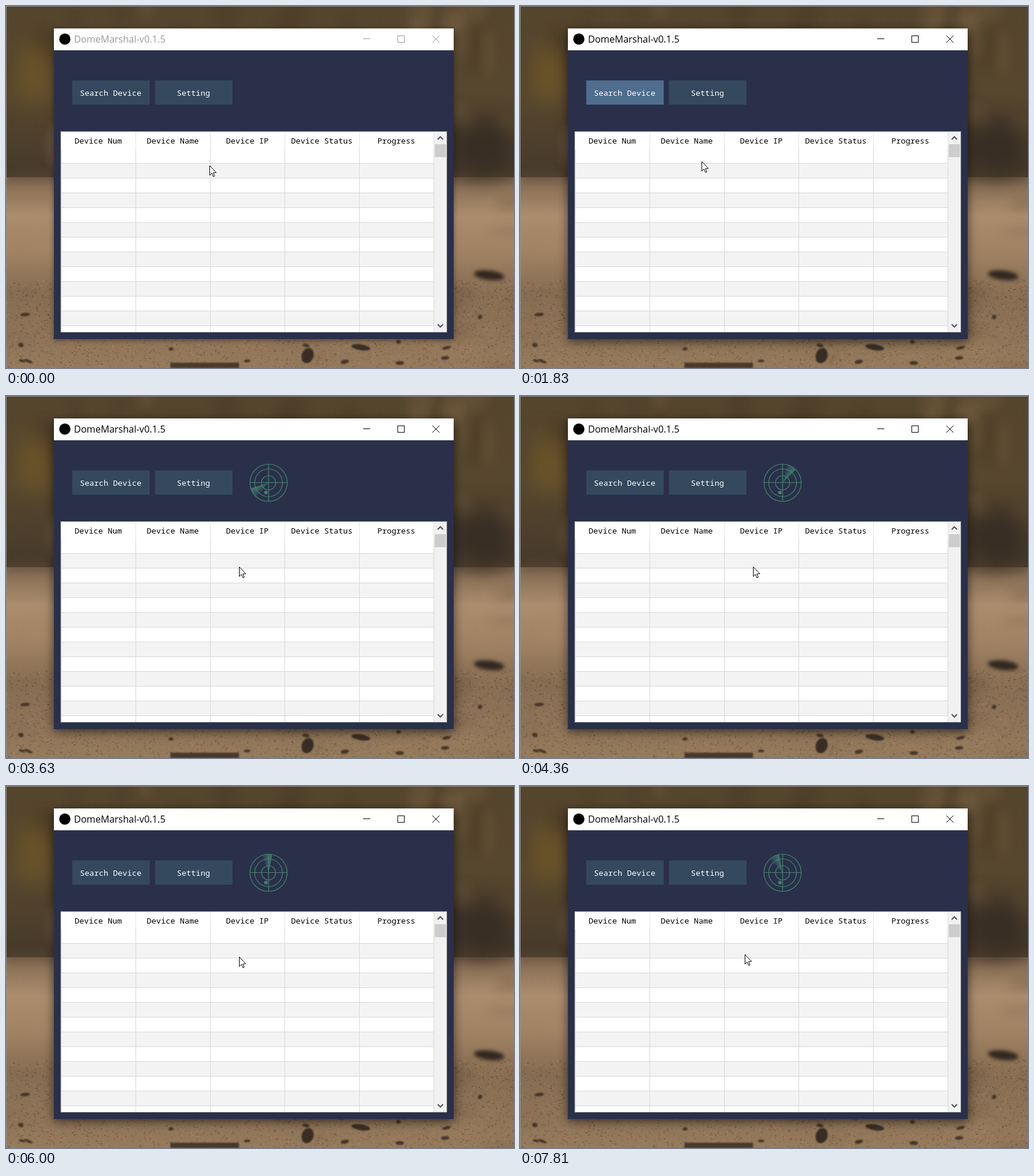
An HTML page with a canvas for the animation above (7990 ms loop, 859 px wide and 613 px high).

```html
<!DOCTYPE html>
<html lang="en">
<head>
<meta charset="utf-8">
<style>
  html, body { margin: 0; width: 100%; height: 100%; overflow: hidden; }
  canvas { display: block; }
</style>
</head>
<body>
<canvas id="stage" width="859" height="613"></canvas>
<script>
const W = 859, H = 613, LOOP = 7990, STEP = 181.6, HORIZON = 290;
const MONO = '300 13.33px "Noto Sans Mono", monospace';
const HEADERS = ['Device Num', 'Device Name', 'Device IP', 'Device Status', 'Progress'];
const NAVY = '#2a304a', SLATE = '#34495e', GRID = '#d8d8d8', GREEN = '#46836f';

// Cursor stops as [step, x, y].
const CURSOR = [
  [0, 344, 270], [3, 200, 144], [8, 200, 144], [10, 307, 263],
  [12, 394, 281], [15, 394, 281], [17, 394, 289], [40, 394, 289], [43, 380, 285]
];

const c = document.getElementById('stage').getContext('2d');
const backdrop = paintBackdrop();

function cursorAt(step) {
  const i = CURSOR.findIndex(k => k[0] >= step);
  const [t1, x1, y1] = CURSOR[i], [t0, x0, y0] = CURSOR[Math.max(i - 1, 0)];
  const f = (step - t0) / (t1 - t0 || 1);
  return [x0 + (x1 - x0) * f, y0 + (y1 - y0) * f];
}

// The sweep turns clockwise and slows slightly; degrees from the top.
function sweepAt(step) {
  const n = step - 15;
  return 42 + 39.8 * n - .13 * n * n;
}

function rect(g, color, x, y, w, h) {
  g.fillStyle = color;
  g.fillRect(x, y, w, h);
}

function disc(g, color, x, y, rx, ry = rx, turn = 0) {
  g.fillStyle = color;
  g.beginPath();
  g.ellipse(x, y, rx, ry, turn, 0, 7);
  g.fill();
}

function line(color, width, ...points) {
  c.strokeStyle = color;
  c.lineWidth = width;
  c.beginPath();
  for (let i = 0; i < points.length; i += 2) c.lineTo(points[i], points[i + 1]);
  c.stroke();
}

function text(string, x, y, color, font = MONO, align = 'center') {
  c.font = font;
  c.textAlign = align;
  c.fillStyle = color;
  c.fillText(string, x, y);
}

// Blurred woods above speckled sand.
function paintBackdrop() {
  const g = Object.assign(document.createElement('canvas'), { width: W, height: H }).getContext('2d');
  let seed = 7;
  const random = (a, b) => a + (b - a) * (seed = seed * 16807 % 2147483647) / 2147483647;
  const shade = alpha => random(0, 1) < .5 ? `rgba(40,28,16,${alpha})` : `rgba(190,160,120,${alpha})`;
  const fade = (top, bottom, colors) => {
    const tone = g.createLinearGradient(0, top, 0, bottom);
    colors.forEach((color, i) => tone.addColorStop(i / (colors.length - 1), color));
    rect(g, tone, 0, top, W, bottom - top);
  };
  fade(0, HORIZON, ['#55452d', '#57472e', '#46392a']);
  fade(HORIZON, H, ['#816850', '#ab8d6d', '#a08263', '#866c51', '#8d7257', '#957a5c']);

  g.filter = 'blur(8px)';
  rect(g, '#5f4c39', 0, HORIZON - 4, W, 8);
  for (let i = 0; i < 60; i++) {
    disc(g, shade(.1), random(0, W), random(0, HORIZON - 30), random(8, 25), random(15, 50));
    disc(g, shade(.1), random(0, W), random(HORIZON + 30, H), random(20, 50), random(4, 12));
  }
  g.filter = 'blur(18px)';
  disc(g, '#6a5429', 48, 115, 30, 50);
  disc(g, '#382e24', 805, 240, 60, 50);
  g.filter = 'none';

  for (let i = 0; i < 4500; i++)
    rect(g, shade(.25), random(0, W), H - 150 * random(0, 1), random(1, 3), random(1, 2));

  g.filter = 'blur(3px)';
  disc(g, '#30271f', 817, 456, 26, 8, .12);
  g.filter = 'blur(1px)';
  disc(g, '#382d24', 510, 592, 10, 13, .3);
  disc(g, '#3a2f26', 600, 578, 16, 5, .15);
  rect(g, '#4a3a2b', 278, 604, 116, 9);
  for (let i = 0; i < 24; i++)
    disc(g, '#453627', random(0, W), random(515, 605), random(3, 9), random(2, 4), random(-.3, .5));
  g.filter = 'none';

  rect(g, '#8d9094', 0, 0, W, 1);
  rect(g, '#8d9094', 0, 0, 1, H);
  return g.canvas;
}

function drawWindow(active, lit) {
  c.save();
  c.shadowColor = `rgba(0,0,0,${active ? .6 : .4})`;
  c.shadowBlur = active ? 16 : 9;
  c.shadowOffsetY = active ? 4 : 2;
  rect(c, NAVY, 81, 38, 676, 526);
  c.restore();
  rect(c, '#fff', 81, 38, 676, 37);

  const ink = active ? '#000' : '#999';
  disc(c, '#000', 99.5, 56, 9.5);
  text('DomeMarshal-v0.1.5', 115, 62, ink, '16px "Open Sans", sans-serif', 'left');
  line(ink, 1, 604, 55.5, 616, 55.5);
  c.strokeRect(662.5, 50.5, 11, 11);
  line(ink, 1, 721, 50, 733, 62);
  line(ink, 1, 733, 50, 721, 62);

  rect(c, lit ? '#4f6d8d' : SLATE, 112, 126, 131, 41);
  rect(c, SLATE, 252, 126, 131, 41);
  text('Search Device', 177, 152, '#fff');
  text('Setting', 317, 152, '#fff');
}

function drawTable(empty) {
  rect(c, '#828790', 92, 212, 654, 341);
  rect(c, '#fff', 93, 213, 652, 339);
  const pitch = empty ? 130.3 : 126;
  HEADERS.forEach((title, i) => {
    text(title, 93 + pitch * (i + .5), 233, '#000');
    rect(c, '#e5e5e5', Math.floor(93 + pitch * (i + 1)), 213, 1, 30);
  });
  if (empty) return;

  for (let y = 266; y < 552; y += 25) {
    if (y % 50 === 16) rect(c, '#f3f3f3', 94, y, 630, 25);
    rect(c, GRID, 93, y, 631, 1);
  }
  for (let x = 93; x < 724; x += 126) rect(c, GRID, x, 242, 1, 310);

  rect(c, '#f1f1f1', 724, 213, 21, 339);
  rect(c, '#cdcdcd', 725, 234, 19, 22);
  line('#505050', 2, 730, 226, 734.5, 221.5, 739, 226);
  line('#505050', 2, 730, 539, 734.5, 543.5, 739, 539);
}

function drawRadar(degrees) {
  const x = 444, y = 147, rad = Math.PI / 180;
  const from = (degrees - 105) * rad, span = 30 * rad;
  const beam = c.createConicGradient(from, x, y);
  beam.addColorStop(0, 'rgba(70,150,120,.15)');
  beam.addColorStop(span / (2 * Math.PI), 'rgba(70,150,120,.7)');
  c.fillStyle = beam;
  c.beginPath();
  c.moveTo(x, y);
  c.arc(x, y, 31.5, from, from + span);
  c.fill();

  for (const r of [12, 23.5, 31.5]) {
    c.beginPath();
    c.arc(x, y, r, 0, 7);
    c.strokeStyle = GREEN;
    c.lineWidth = 1.2;
    c.stroke();
  }
  line(GREEN, 1.2, 412, 146.5, 476, 146.5);
  line(GREEN, 1.2, x, 115, x, 179);
  disc(c, GREEN, 439.5, 163.5, 3);
}

function drawCursor(x, y) {
  const arrow = new Path2D('M0 0V16L3.6 12.6 6.2 18.4 8.4 17.4 6 11.8 11 11.5Z');
  c.save();
  c.translate(Math.round(x) + .5, Math.round(y) + .5);
  c.fillStyle = '#fff';
  c.fill(arrow);
  c.strokeStyle = '#000';
  c.lineWidth = 1;
  c.stroke(arrow);
  c.restore();
}

function render(now) {
  const step = Math.floor((now % LOOP + 5) / STEP) % 44;
  const searching = step >= 12;
  c.drawImage(backdrop, 0, 0);
  drawWindow(step >= 6, step >= 3 && !searching);
  drawTable(searching && step < 16);
  if (searching) drawRadar(sweepAt(step));
  drawCursor(...cursorAt(step));
  requestAnimationFrame(render);
}
requestAnimationFrame(render);
</script>
</body>
</html>
```
